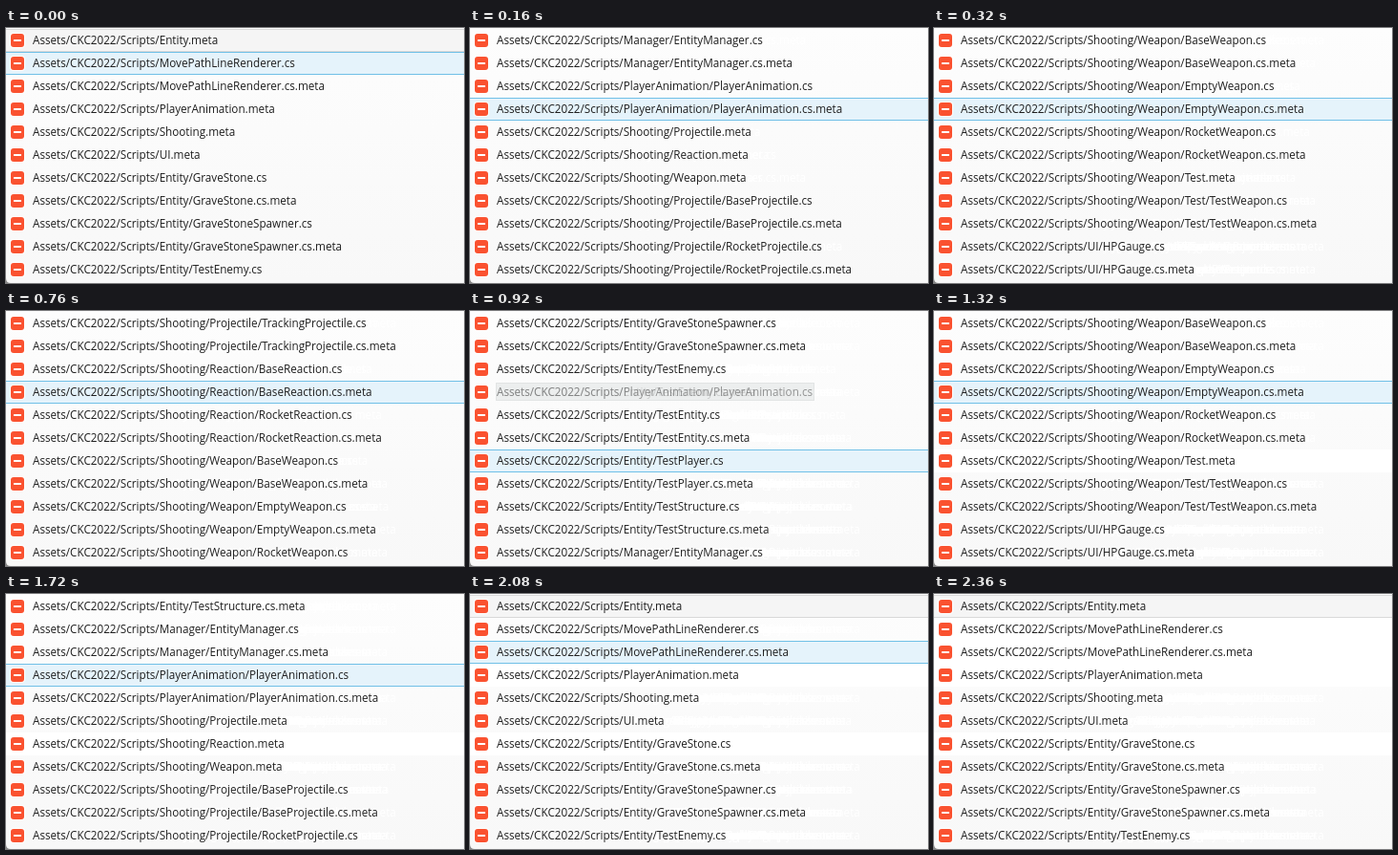
An HTML page with a canvas for the animation above (2.56 s loop, 480x267 px).

```html
<!DOCTYPE html>
<html lang="en">
<head>
<meta charset="utf-8">
<title>Changed files</title>
<style>
  html, body { margin: 0; width: 100%; height: 100%; overflow: hidden; background: #f9f9f9; }
  canvas { display: block; width: 480px; height: 267px; }
</style>
</head>
<body>
<canvas id="stage"></canvas>
<script>
const WIDTH = 480, HEIGHT = 267, LOOP = 2560, TICK = 40;
const ROW = 24, TOP = 1, VISIBLE = 11, NOTCH = 3;
const FONT = '11.7px "Open Sans", "Noto Sans", sans-serif';

const withMeta = (folder, names) =>
  names.flatMap(name => [`${folder}${name}.cs`, `${folder}${name}.cs.meta`]);

const files = [
  'Entity.meta',
  ...withMeta('', ['MovePathLineRenderer']),
  'PlayerAnimation.meta', 'Shooting.meta', 'UI.meta',
  ...withMeta('Entity/', ['GraveStone', 'GraveStoneSpawner', 'TestEnemy',
    'TestEntity', 'TestPlayer', 'TestStructure']),
  ...withMeta('Manager/', ['EntityManager']),
  ...withMeta('PlayerAnimation/', ['PlayerAnimation']),
  'Shooting/Projectile.meta', 'Shooting/Reaction.meta', 'Shooting/Weapon.meta',
  ...withMeta('Shooting/Projectile/', ['BaseProjectile', 'RocketProjectile', 'TrackingProjectile']),
  ...withMeta('Shooting/Reaction/', ['BaseReaction', 'RocketReaction']),
  ...withMeta('Shooting/Weapon/', ['BaseWeapon', 'EmptyWeapon', 'RocketWeapon']),
  'Shooting/Weapon/Test.meta',
  ...withMeta('Shooting/Weapon/Test/', ['TestWeapon']),
  ...withMeta('UI/', ['HPGauge'])
].map(path => 'Assets/CKC2022/Scripts/' + path);

const LAST = files.length - VISIBLE;

// Each spin of the wheel; power above 1 slows it towards its end.
const spins = [
  { start: 0, end: 320, from: 0, to: LAST },
  { start: 720, end: 980, from: LAST, to: 0 },
  { start: 1080, end: 1320, from: 0, to: LAST },
  { start: 1560, end: 1880, from: LAST, to: 5, power: 1.3 },
  { start: 2000, end: 2080, from: 5, to: 0 }
];

// The row under the pointer from each time on
const hovers = [
  { at: 0, row: 1 }, { at: 80, row: 2 }, { at: 160, row: 3 }, { at: 880, row: 5 },
  { at: 920, row: 6 }, { at: 1280, row: 3 }, { at: 2080, row: 2 }, { at: 2240, row: 1 },
  { at: 2360, row: -1 }
];

const WHITE_ROWS_FROM = 920;
const TOOLTIP = { from: 880, to: 960, row: 3, file: 20 };

function scrollAt(time) {
  const { start, end, from, to, power = 1 } = spins.findLast(spin => spin.start <= time);
  const progress = 1 - (1 - Math.min(1, (time - start) / (end - start))) ** power;
  const distance = Math.abs(to - from);
  const moved = Math.min(distance, NOTCH * Math.round(progress * distance / NOTCH));
  return from + Math.sign(to - from) * moved;
}

const hoverAt = time => hovers.findLast(hover => hover.at <= time).row;

const canvas = document.getElementById('stage');
const ctx = canvas.getContext('2d');
const ratio = window.devicePixelRatio || 1;
canvas.width = Math.round(WIDTH * ratio);
canvas.height = Math.round(HEIGHT * ratio);
ctx.scale(ratio, ratio);

const backdrop = ctx.createLinearGradient(0, 0, 0, HEIGHT);
backdrop.addColorStop(0, '#fdfdfd');
backdrop.addColorStop(1, '#f8f8f8');

const rowY = row => TOP + row * ROW;

function rect(x, y, w, h, color) {
  ctx.fillStyle = color;
  ctx.fillRect(x, y, w, h);
}

function roundRect(x, y, size, radius, color) {
  ctx.fillStyle = color;
  ctx.beginPath();
  ctx.roundRect(x, y, size, size, radius);
  ctx.fill();
}

function band(row, fill, edge = fill) {
  rect(0, rowY(row), WIDTH, ROW, edge);
  rect(0, rowY(row) + 1, WIDTH, ROW - 2, fill);
}

function label(file, row, color) {
  ctx.fillStyle = color;
  ctx.fillText(files[file], 28, rowY(row) + 16);
}

function labels(first, color) {
  for (let row = 0; row < VISIBLE; row++) label(first + row, row, color);
}

function icon(row) {
  const y = rowY(row) + 5;
  roundRect(4, y - 1, 16, 4, '#fff');
  roundRect(5, y, 14, 3, '#fa5230');
  rect(8, y + 6, 8, 2, '#fff');
}

function tooltip() {
  const y = rowY(TOOLTIP.row);
  ctx.globalAlpha = 0.6;
  rect(27, y + 2, 334, 19, '#d2d6d6');
  rect(28, y + 3, 332, 17, '#f3f5f5');
  label(TOOLTIP.file, TOOLTIP.row, '#555');
  ctx.globalAlpha = 1;
}

function corner() {
  ctx.fillStyle = '#8a8a8a';
  ctx.beginPath();
  ctx.moveTo(0, HEIGHT - 5);
  ctx.quadraticCurveTo(0, HEIGHT, 5, HEIGHT);
  ctx.lineTo(0, HEIGHT);
  ctx.fill();
}

// Rows shown or hovered earlier leave white traces behind.
function traces(now, first) {
  const seen = new Set();
  const left = new Set();
  for (let time = 0; time < now; time += TICK) {
    seen.add(scrollAt(time));
    if (time >= WHITE_ROWS_FROM) left.add(hoverAt(time));
  }
  seen.delete(first);
  seen.forEach(old => labels(old, '#fff'));
  left.forEach(row => { if (row >= 0) band(row, '#fff'); });
}

function draw(now) {
  const first = scrollAt(now);
  const hover = hoverAt(now);

  ctx.font = FONT;
  rect(0, 0, WIDTH, HEIGHT, backdrop);
  traces(now, first);

  if (first === 0) band(0, '#f5f5f5', '#d9d9d9');
  if (hover >= 0) band(hover, '#e5f3fb', '#70c0e7');

  labels(first, '#1e1e1e');
  for (let row = 0; row < VISIBLE; row++) icon(row);
  if (now >= TOOLTIP.from && now < TOOLTIP.to) tooltip();
  corner();
}

const begin = performance.now();
function tick() {
  const time = (performance.now() - begin) % LOOP;
  draw(Math.floor(time / TICK) * TICK);
  requestAnimationFrame(tick);
}
tick();
</script>
</body>
</html>
```
